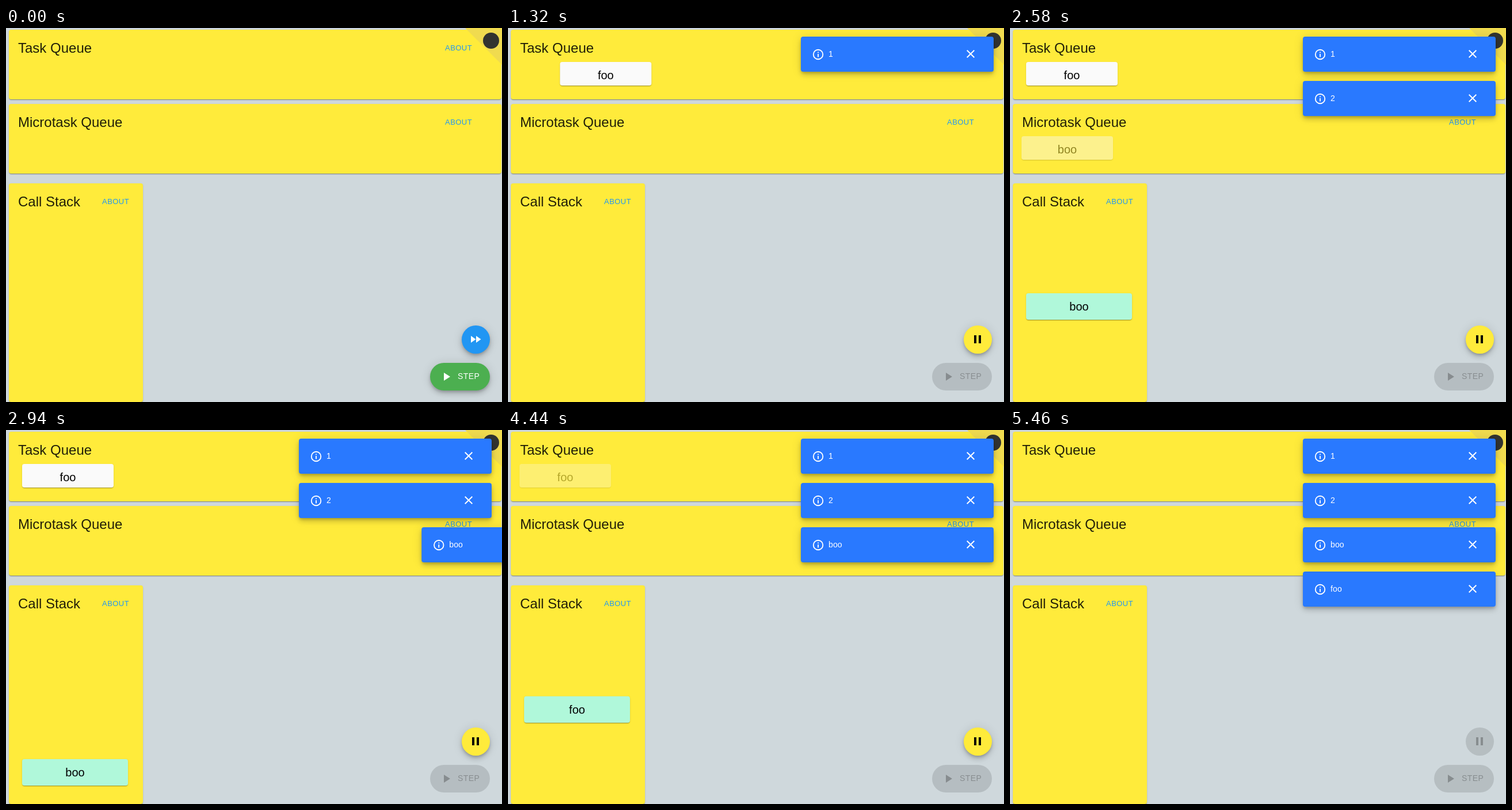
Recreate the animation shown at these times as an HTML page. Size 862x650 px, loop 6030 ms.

```html
<!DOCTYPE html>
<html lang="en">
<head>
<meta charset="utf-8">
<title>Event loop</title>
<style>
html, body { margin: 0; width: 100%; height: 100%; overflow: hidden; }
body {
  position: relative;
  background: #cfd8dc;
  color: rgba(0, 0, 0, .87);
  font-family: "Liberation Sans", Arial, sans-serif;
  --low: 0 2px 1px -1px rgba(0,0,0,.2), 0 1px 1px rgba(0,0,0,.14), 0 1px 3px rgba(0,0,0,.12);
  --high: 0 3px 5px -1px rgba(0,0,0,.2), 0 6px 10px rgba(0,0,0,.14), 0 1px 18px rgba(0,0,0,.12);
  --flat: 0 0 0 0 transparent, 0 0 0 transparent, 0 0 0 transparent;
}
body *, svg { position: absolute; box-sizing: border-box; }
svg { width: 24px; height: 24px; fill: currentColor; overflow: visible; }
svg * { position: static; }

/* panels */
.panel { left: 5px; width: 856px; height: 121px; background: #ffeb3b; border-radius: 4px; box-shadow: var(--low); }
.panel h2 { margin: 0; left: 16px; top: 16px; font: 400 24px/32px "Liberation Sans", Arial, sans-serif; white-space: nowrap; }
.about { left: 758px; top: 20px; font-size: 13px; line-height: 23px; letter-spacing: .46px; color: #2196f3; }
.stack { top: 270px; width: 233px; height: 380px; }
.stack .about { left: 162px; }
.corner { left: 798px; top: 0; width: 64px; height: 64px; }

/* moving parts */
.item, .toast, .fab, .fab * { animation: 6.03s infinite; }
.item {
  left: 28px; width: 159px; height: 41px;
  background: #fafafa; border-radius: 4px; box-shadow: var(--low);
  color: #000; font-size: 20px; line-height: 46px; text-align: center;
  animation-timing-function: cubic-bezier(.5, 1, .89, 1);
}
.call { top: 572px; width: 184px; height: 46px; background: #b0f8da; }
.toast {
  left: 509px; width: 335px; height: 61px;
  background: #2979ff; border-radius: 4px; box-shadow: var(--high);
  color: #fff; font-size: 14px; line-height: 20px; letter-spacing: .15px;
  animation-timing-function: cubic-bezier(0, 0, .2, 1);
}
.toast span { left: 48px; top: 20px; }
.info { left: 19px; top: 19.5px; width: 22px; height: 22px; }
.close { left: 283px; top: 18px; }

.fab {
  border-radius: 25px; box-shadow: var(--high); color: #fff;
  animation-timing-function: cubic-bezier(.4, 0, .2, 1);
}
.run { left: 792px; top: 517px; width: 49px; height: 49px; background: #2196f3; animation-name: run; }
.run svg { left: 12px; top: 12px; animation-timing-function: step-end; }
.clip { inset: 0; border-radius: 50%; overflow: hidden; }
.ripple { inset: 0; border-radius: 50%; background: currentColor; opacity: 0; animation-name: ripple; }
.forward { animation-name: forward; }
.pause { animation-name: pause; }
.step { left: 737px; top: 582px; width: 104px; height: 48px; background: #4caf50; animation-name: step; }
.step svg { left: 16px; top: 11.5px; }
.step span { left: 48px; top: 13px; font-size: 14px; line-height: 20px; letter-spacing: .4px; }

@keyframes run {
  0%, 10.95% { background: #2196f3; color: #fff; }
  11% { color: #000; }
  15.09%, 87.23% { background: #ffeb3b; color: #000; box-shadow: var(--high); }
  90.55%, 100% { background: rgba(0,0,0,.12); color: rgba(0,0,0,.26); box-shadow: var(--flat); }
}
@keyframes step {
  0%, 10.95% { background: #4caf50; color: #fff; box-shadow: var(--high); }
  15.09%, 100% { background: rgba(0,0,0,.12); color: rgba(0,0,0,.26); box-shadow: var(--flat); }
}
@keyframes ripple {
  0%, 9.4% { transform: scale(0); opacity: .3; }
  14.9% { transform: none; opacity: .2; }
  19.4%, 100% { transform: none; opacity: 0; }
}
@keyframes forward { 0% { opacity: 1; } 10.95%, 100% { opacity: 0; } }
@keyframes pause { 0% { opacity: 0; } 10.95%, 100% { opacity: 1; } }

/* queues: slide in from the right, fade out */
@keyframes task {
  0%, 19.7% { transform: translateX(200px); visibility: hidden; }
  24.68%, 72.45% { transform: none; opacity: 1; visibility: visible; }
  72.5% { transform: translateX(-8px); }
  75%, 100% { transform: translateX(-8px); opacity: 0; visibility: hidden; }
}
@keyframes micro {
  0%, 27.94% { transform: translateX(200px); visibility: hidden; }
  32.42%, 41.95% { transform: none; opacity: 1; visibility: visible; }
  42% { transform: translateX(-8px); }
  44.44%, 100% { transform: translateX(-8px); opacity: 0; visibility: hidden; }
}
/* call stack: drop in, fly out upwards */
@keyframes call-boo {
  0%, 41.87% { transform: translate(0, -200px); visibility: hidden; }
  45.52%, 56.47% { transform: translate(0, 0); opacity: 1; visibility: visible; }
  56.48% { transform: translate(8px, 0); }
  60.53%, 100% { transform: translate(8px, -200px); opacity: 0; visibility: hidden; }
}
@keyframes call-foo {
  0%, 72.39% { transform: translate(0, -200px); visibility: hidden; }
  77.2%, 87.26% { transform: translate(0, 0); opacity: 1; visibility: visible; }
  87.27% { transform: translate(8px, 0); }
  90.55%, 100% { transform: translate(8px, -200px); opacity: 0; visibility: hidden; }
}
@keyframes toast-1 {
  0%, 13.1% { transform: translateX(353px); visibility: hidden; }
  16.83%, 100% { transform: none; visibility: visible; }
}
@keyframes toast-2 {
  0%, 34.46% { transform: translateX(353px); visibility: hidden; }
  38.19%, 100% { transform: none; visibility: visible; }
}
@keyframes toast-boo {
  0%, 48.24% { transform: translateX(353px); visibility: hidden; }
  51.97%, 100% { transform: none; visibility: visible; }
}
@keyframes toast-foo {
  0%, 79.45% { transform: translateX(353px); }
  0%, 80% { visibility: hidden; }
  83.18%, 100% { transform: none; visibility: visible; }
}
</style>
</head>
<body>
<svg style="width:0;height:0" aria-hidden="true">
  <symbol id="info" viewBox="0 0 24 24">
    <circle cx="12" cy="12" r="9" fill="none" stroke="currentColor" stroke-width="2"/>
    <path d="M11 7h2v2h-2zM11 11h2v6h-2z"/>
  </symbol>
  <symbol id="close" viewBox="0 0 24 24">
    <path d="M5.7 5.7 18.3 18.3M18.3 5.7 5.7 18.3" fill="none" stroke="currentColor" stroke-width="2"/>
  </symbol>
</svg>

<section class="panel" style="top:3px"><h2>Task Queue</h2><span class="about">ABOUT</span></section>
<section class="panel" style="top:132px"><h2>Microtask Queue</h2><span class="about">ABOUT</span></section>
<section class="panel stack"><h2>Call Stack</h2><span class="about">ABOUT</span></section>

<svg class="corner" viewBox="0 0 64 64">
  <path d="M0 0H64V64z" fill="#f0db4f"/>
  <circle cx="45" cy="22" r="14" fill="#323330"/>
</svg>

<div class="item" style="top:59px;animation-name:task">foo</div>
<div class="item" style="top:188px;animation-name:micro">boo</div>
<div class="item call" style="animation-name:call-boo">boo</div>
<div class="item call" style="animation-name:call-foo">foo</div>

<div class="fab run">
  <div class="clip"><div class="ripple"></div></div>
  <svg class="forward" viewBox="0 0 24 24"><path d="M4 18l8.5-6L4 6zM13 6v12l8.5-6z"/></svg>
  <svg class="pause" viewBox="0 0 24 24"><path d="M6 5h4v14H6zM14 5h4v14h-4z"/></svg>
</div>
<div class="fab step">
  <svg viewBox="0 0 24 24"><path d="M8 5v14l11-7z"/></svg>
  <span>STEP</span>
</div>

<div class="toast" style="top:15px;animation-name:toast-1">
  <svg class="info"><use href="#info"/></svg><span>1</span><svg class="close"><use href="#close"/></svg>
</div>
<div class="toast" style="top:92px;animation-name:toast-2">
  <svg class="info"><use href="#info"/></svg><span>2</span><svg class="close"><use href="#close"/></svg>
</div>
<div class="toast" style="top:169px;animation-name:toast-boo">
  <svg class="info"><use href="#info"/></svg><span>boo</span><svg class="close"><use href="#close"/></svg>
</div>
<div class="toast" style="top:246px;animation-name:toast-foo">
  <svg class="info"><use href="#info"/></svg><span>foo</span><svg class="close"><use href="#close"/></svg>
</div>
</body>
</html>
```
